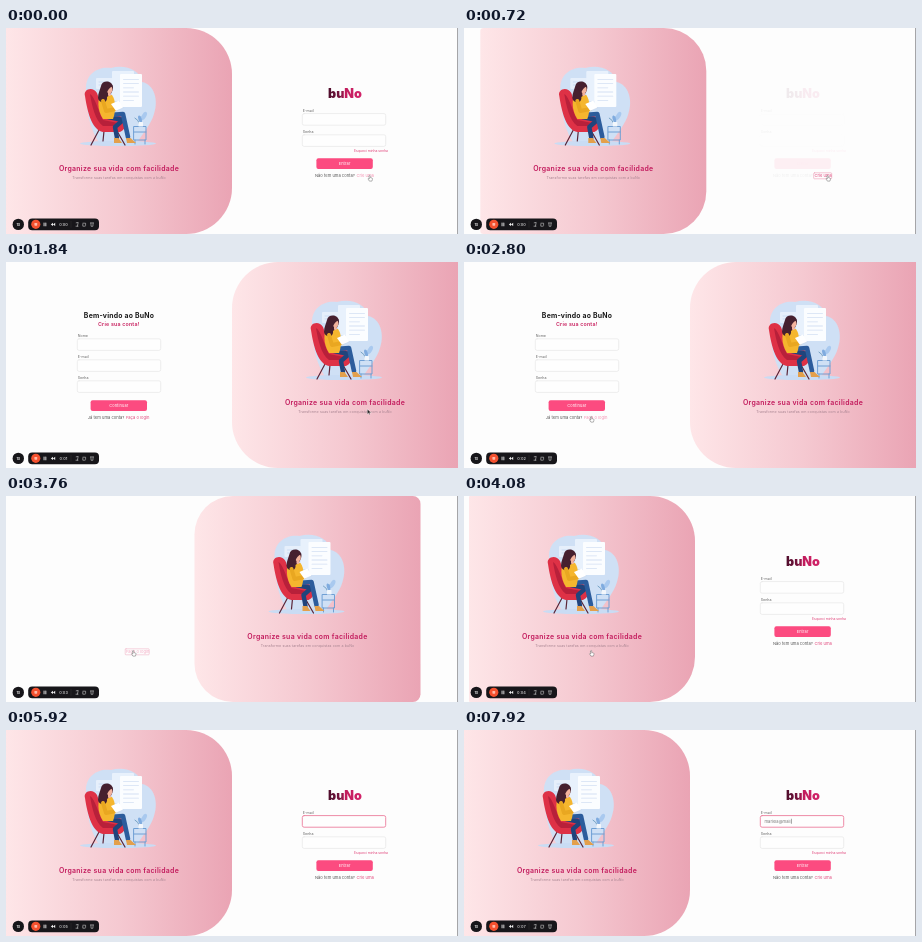
Animation of 452 by 206 pixels, one loop 8 s. Source, as an HTML page with a canvas:

```html
<!DOCTYPE html>
<html lang="pt-BR">
<head>
<meta charset="utf-8">
<title>Organize sua vida</title>
<style>
html, body { margin: 0; width: 100%; height: 100%; overflow: hidden; background: #fdfdfd; }
canvas { display: block; width: 452px; height: 206px; }
</style>
</head>
<body>
<canvas id="stage"></canvas>
<script>
const W = 452, H = 206, LOOP = 8000, HALF = 226, CORNER = 46;
const PINK = '#fc4b80', ROSE = '#c8205f';
const FONT = 'Inter, "Open Sans", sans-serif';
const canvas = document.getElementById('stage');
const dpr = window.devicePixelRatio || 1;
canvas.width = W * dpr;
canvas.height = H * dpr;
const c = canvas.getContext('2d');

const clamp = v => Math.max(0, Math.min(1, v));
const ramp = (t, a, b) => clamp((t - a) / (b - a));
const quint = k => k < 0.5 ? 16 * k ** 5 : 1 - 16 * (1 - k) ** 5;
const smooth = k => k * k * (3 - 2 * k);
const mix = (a, b, k) => a + (b - a) * k;

function text(s, x, y, size, color, weight = 400, align = 'left', spacing = 0) {
  c.font = `${weight} ${size}px ${FONT}`;
  c.letterSpacing = spacing + 'px';
  c.textAlign = align;
  c.fillStyle = color;
  c.fillText(s, x, y);
  return c.measureText(s).width;
}
function box(x, y, w, h, r, fill, stroke, lw = 0.6) {
  c.beginPath();
  c.roundRect(x, y, w, h, r);
  if (fill) { c.fillStyle = fill; c.fill(); }
  if (stroke) { c.strokeStyle = stroke; c.lineWidth = lw; c.stroke(); }
}
function oval(x, y, rx, ry, fill, rot = 0) {
  c.beginPath();
  c.ellipse(x, y, rx, ry, rot, 0, 7);
  c.fillStyle = fill;
  c.fill();
}
function shape(d, fill) {
  c.fillStyle = fill;
  c.fill(new Path2D(d));
}
function line(d, color, lw) {
  c.strokeStyle = color;
  c.lineWidth = lw;
  c.lineCap = c.lineJoin = 'round';
  c.stroke(new Path2D(d));
}

// Woman reading in an armchair, in panel coordinates
function picture() {
  shape('M80 60C80 46 92 38 105 40C118 36 134 41 136 54C148 56 153 72 148 86C145 96 138 104 132 113H92C82 97 80 76 80 60Z', '#cfe0f5');
  oval(112, 115.5, 38, 2.6, '#c9dcf4');
  box(90, 50, 17, 11, 1, '#e6effb');
  box(106, 43, 22, 30, 1, '#e8f1fc');
  box(114, 46, 22, 33, 1, '#fbfdff');
  for (let i = 0; i < 6; i++) box(117, 51 + i * 4.2, i % 3 == 2 ? 11 : 16, 0.8, 0.4, '#d3e0f3');
  line('M93 54H103M93 57H100', '#bdd2ee', 0.7);

  line('M128 98.5H140V112H128ZM128 104H140M129 112V116M139 112V116', '#6f9fd4', 1);
  line('M134 97Q132 91 129 90M135 97V89', '#5f93b8', 0.8);
  oval(138, 88, 2.2, 4.6, '#a9c9ef', 0.5);
  oval(134, 91, 1.6, 3.6, '#7fabdf', -0.3);
  box(132.5, 94, 4.5, 4.5, 0.6, '#f3f7fc');

  line('M93 102L85 117M111 103L119 117M98 103L97 113', '#5a2437', 1.2);
  shape('M79 68C77 61 87 58 91 65L99 88L114 88C120 90 122 101 114 104H97C87 102 82 88 79 68Z', '#de3146');
  shape('M84 66C89 69 92 82 97 92L112 95V98H97C89 92 86 78 84 66Z', '#b8203a');

  line('M102 89L117 92L109 99L111 110', '#20447c', 4.4);
  line('M103 87L117 86L122 109', '#2c5c9c', 4.6);
  shape('M108 110H112.5L116 115H108Z', '#e3a04c');
  shape('M120 110H124.5L130 115H121Z', '#e3a04c');

  shape('M96 66C91 69 91 82 97 91H107C110 83 110 72 106 67Z', '#f5b62e');
  shape('M95 58C96 52 106 52 107 59C107 64 104 67 101 69C102 76 93 76 92 70C92 65 94 62 95 58Z', '#46202f');
  oval(103.4, 61.5, 2.9, 3.8, '#f3b39d');
  box(102, 64, 2.8, 4, 1, '#f3b39d');
  shape('M97 59Q101 53 107 58Q102 60 100.5 66Z', '#46202f');
  line('M97 73L100 83L110 81', '#e9a721', 4);
  oval(111, 80.5, 1.7, 1.4, '#f3b39d');
  shape('M105 76L113 72.5L117 80L110 83Z', '#ffffff');
  line('M110 83L117 80', '#c3d3ea', 0.6);
}

function panel(p) {
  const r = CORNER * (1 - p), l = CORNER * p;
  c.save();
  c.translate(HALF * p, 0);
  const g = c.createLinearGradient(0, 0, HALF, 0);
  g.addColorStop(0, '#fee6e8');
  g.addColorStop(0.5, '#f5c9d1');
  g.addColorStop(1, '#eaa4b4');
  box(0, 0, HALF, H, [l, r, r, l], g);
  picture();
  text('Organize sua vida com facilidade', 113, 142.8, 6.9, '#c2185b', 600, 'center', 0.32);
  text('Transforme suas tarefas em conquistas com a buNo', 113, 150.6, 3.6, '#a98592', 400, 'center', 0.1);
  c.restore();
}

function field(label, x, y, focused) {
  text(label, x + 0.8, y - 1.6, 3.6, '#666');
  box(x + 0.3, y + 0.3, 83.4, 11.6, 1.8, '#fefefe', focused ? '#ec7f9f' : '#e2e2e2', focused ? 0.9 : 0.6);
}
function button(label, x, y) {
  box(x, y, 56.4, 10.6, 2, PINK);
  text(label, x + 28.2, y + 6.8, 3.9, '#ffe9f0', 500, 'center', 0.1);
}
function link(s, x, y, w, hover, ring, alpha) {
  c.globalAlpha = alpha;
  text(s, x, y, 4.1, hover ? '#f48fb0' : '#e0447a');
  if (ring) box(x - 0.8, y - 4.2, w, 6, 0.8, null, '#ec9db5', 0.6);
  c.globalAlpha = 1;
}

const LOGIN = 'buNo';
const KEYS = [6080, 6160, 6240, 6320, 6500, 6720, 7040, 7200, 7440, 7600, 7760, 7920];

function signIn(t, alpha, linkAlpha, ring) {
  c.globalAlpha = alpha;
  const g = c.createLinearGradient(321, 0, 356, 0);
  g.addColorStop(0, '#4a0d2a');
  g.addColorStop(0.4, '#7c1440');
  g.addColorStop(0.5, '#c01c5c');
  g.addColorStop(1, '#d3246a');
  text(LOGIN, 339, 70, 12.6, g, 900, 'center');
  field('E-mail', 296, 85.3, t >= 5120);
  field('Senha', 296, 106.5, false);
  text('Esqueci minha senha', 382, 123.6, 3.4, '#e0447a', 400, 'right');
  button('Entrar', 310.4, 130.3);
  text('Não tem uma conta?', 348.8, 149, 4.1, '#555', 400, 'right');
  const typed = 'mariela@mail'.slice(0, KEYS.filter(k => t >= k).length);
  if (typed) {
    const w = text(typed, 300.5, 93, 4.1, '#777');
    box(301 + w, 88.8, 0.5, 5, 0, '#444');
  }
  link('Crie uma', 350.5, 149, 18, t < 460, ring, linkAlpha);
}

function signUp(t, alpha, linkAlpha, ring) {
  c.globalAlpha = alpha;
  text('Bem-vindo ao BuNo', 113, 55.7, 6.9, '#181818', 700, 'center', 0.2);
  text('Crie sua conta!', 112.8, 64.2, 5.3, ROSE, 600, 'center', 0.2);
  field('Nome', 71, 76.5);
  field('E-mail', 71, 97.5);
  field('Senha', 71, 118.5);
  button('Continuar', 84.6, 138.3);
  text('Já tem uma conta?', 118.4, 157, 4.1, '#555', 400, 'right');
  link('Faça o login', 120, 157, 24, t > 2600, ring, linkAlpha);
}

function pointer(t) {
  if (t >= 5120) return;
  const a = smooth(ramp(t, 1800, 2640)), b = smooth(ramp(t, 4300, 4980));
  const x = mix(mix(364, 127.5, a), 311, b), y = mix(mix(149.5, 156.5, a), 91, b);
  const moving = (a > 0 && a < 1) || b > 0;
  c.save();
  c.translate(x, y);
  if (b > 0.97) {
    line('M0 -2.5V2.5M-1 -2.5H1M-1 2.5H1', '#333', 0.6);
  } else if (moving) {
    const arrow = 'M-1 -2.4V2.6L.2 1.5L1 3.2L1.8 2.8L1 1.2H2.6Z';
    shape(arrow, '#222');
    line(arrow, '#fff', 0.35);
  } else {
    const hand = 'M-.9 -1.8Q-.3 -2.6 .2 -1.8V0L2 .5Q2.6 .8 2.4 2L1.9 3.6H-.6L-2 1.4Q-2 .6 -.9 1.1Z';
    shape(hand, '#fff');
    line(hand, '#555', 0.45);
  }
  c.restore();
}

function recorder(t) {
  oval(12.3, 196.4, 5.7, 5.7, '#17161a');
  text('1x', 12.3, 197.7, 3.8, '#eee', 600, 'center');
  box(22.2, 190.5, 70.8, 11.7, 4, '#17161a');
  oval(29.8, 196.3, 4.6, 4.6, '#f4512f');
  box(28.4, 194.9, 2.8, 2.8, 0.6, '#ffb9a8');
  box(37.6, 194.6, 0.9, 3.6, 0.3, '#eee');
  box(39.4, 194.6, 0.9, 3.6, 0.3, '#eee');
  shape('M47 194.7V198.1L44.8 196.4ZM49.2 194.7V198.1L47 196.4Z', '#eee');
  text('0:0' + Math.floor(t / 1000), 57.5, 197.7, 3.9, '#ddd', 500, 'center');
  line('M65 193.4V199.4', '#333', 0.5);
  line('M70.2 194.8L72.2 194.4L71.4 198.2M70 198.2H72', '#ccc', 0.6);
  line('M77 195.2H79.6V197.4M79 198.2H76.8V196', '#ccc', 0.6);
  line('M84.4 194.9H87.6M84.9 195.4L85.1 198.3H86.9L87.1 195.4', '#ccc', 0.6);
}

function draw(t) {
  c.setTransform(dpr, 0, 0, dpr, 0, 0);
  c.globalAlpha = 1;
  c.fillStyle = '#fdfdfd';
  c.fillRect(0, 0, W, H);

  const back = t > 3000;
  const start = back ? 3376 : 463;
  const since = t - start;
  let p = quint(clamp(since / (back ? 960 : 760)));
  if (back) {
    p = 1 - p;
    if (t < 4280) p = Math.max(p, 5 / HALF);
  }
  const out = 1 - ramp(since, 0, 280);
  const outLink = 1 - ramp(since, 320, 560);
  const come = ramp(since, 400, 570);
  const ring = since > 0;
  const [leave, enter] = back ? [signUp, signIn] : [signIn, signUp];
  if (outLink > 0) leave(t, out, outLink, ring);
  if (come > 0) enter(t, come, come, false);
  c.globalAlpha = 1;

  box(451, 0, 1, H, 0, '#a5a5a8');
  panel(p);
  pointer(t);
  recorder(t);
}

const begin = performance.now();
function tick() {
  draw((performance.now() - begin) % LOOP);
  requestAnimationFrame(tick);
}
tick();
</script>
</body>
</html>
```
